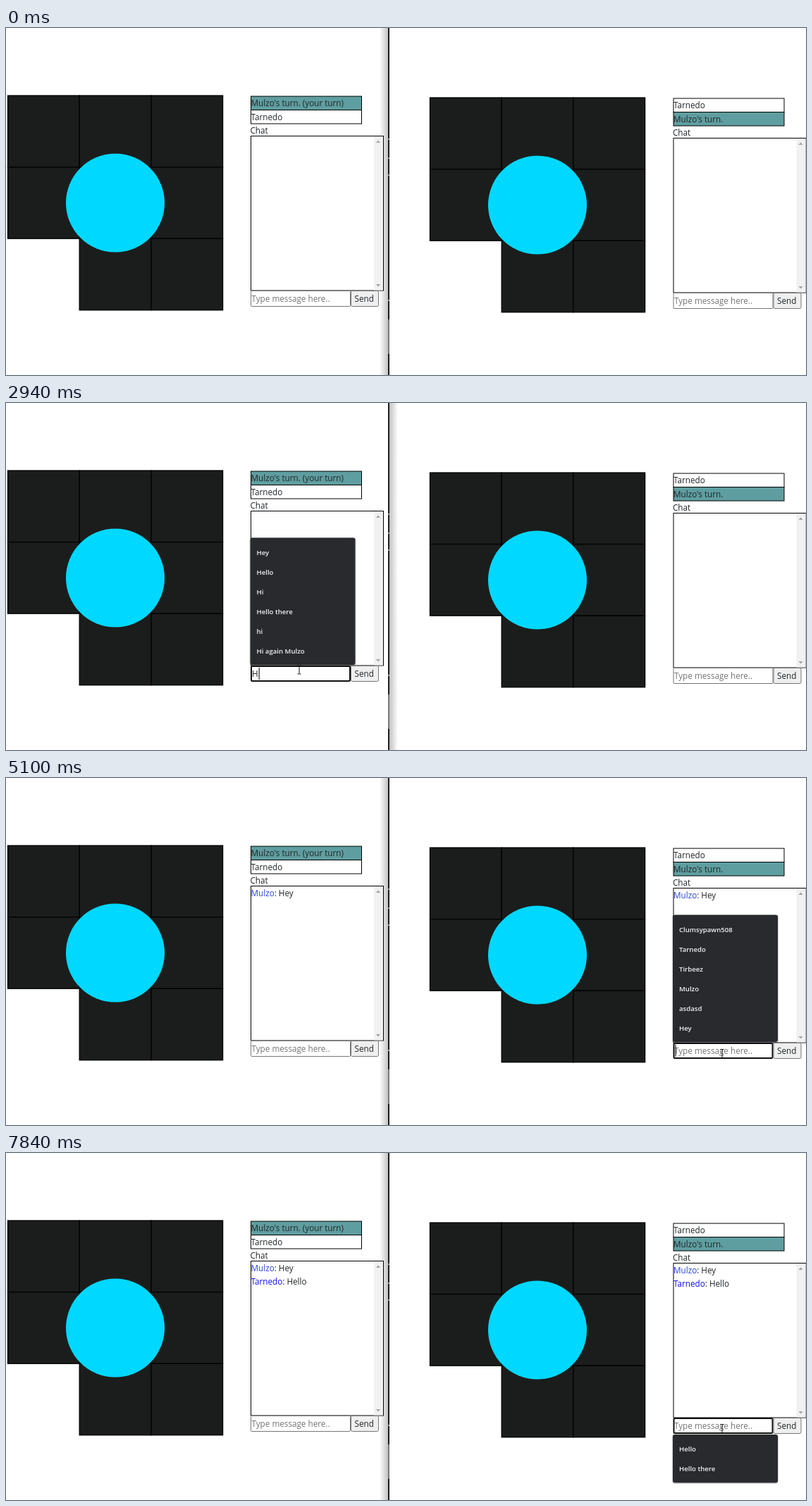
Recreate the animation shown at these times as an HTML page. Size 1135 by 493 pixels, loop 8 s.

```html
<!DOCTYPE html>
<html lang="en">
<head>
<meta charset="utf-8">
<title>Puzzle chat</title>
<style>
  html, body { margin: 0; width: 100%; height: 100%; overflow: hidden; background: #fff; }
  svg { display: block; font: 11.7px "Open Sans", "Noto Sans", sans-serif; fill: #212529; }
  .item { font-size: 9.6px; font-weight: 600; fill: #f1f2f4; }
  .hint { fill: #757575; }
</style>
</head>
<body>
<svg id="stage" width="1135" height="493" viewBox="0 0 1135 493"></svg>
<script>
const LOOP = 8000;
const ME = 'Mulzo', RIVAL = 'Tarnedo';
const stage = document.getElementById('stage');
const pen = document.createElement('canvas').getContext('2d');

const HISTORY = ['Clumsypawn508', RIVAL, 'Tirbeez', ME, 'asdasd', 'Hey'];
const H_WORDS = ['Hey', 'Hello', 'Hi', 'Hello there', 'hi', 'Hi again ' + ME];
const HE_WORDS = ['Hey', 'Hello', 'Hello there'];
const HEL_WORDS = ['Hello', 'Hello there'];

// Each step: start time, typed text, suggestions, caret visible
const LEFT = [
  [1940, '', [], 1], [2010, '', HISTORY, 1], [2470, '', HISTORY, 0],
  [2940, 'H', H_WORDS, 1], [3140, 'He', HE_WORDS, 1], [3270, 'Hey', ['Hey'], 1],
  [3420, '', ['Hey'], 1], [3490, '', [], 1], [3750, '', [], 0], [4270, '', [], 1], [4760, '', [], 0]
];
const RIGHT = [
  [4830, '', [], 1], [4960, '', HISTORY, 1], [5630, '', HISTORY, 0],
  [5890, 'H', H_WORDS, 1], [6020, 'He', HE_WORDS, 1], [6170, 'Hek', [], 1],
  [6310, 'Hekl', [], 1], [6580, 'Hek', [], 1], [6780, 'He', HE_WORDS, 1],
  [6910, 'Hel', HEL_WORDS, 1], [7040, 'Hell', HEL_WORDS, 1], [7240, 'Hello', HEL_WORDS, 1],
  [7510, '', HEL_WORDS, 1], [7840, '', HEL_WORDS, 0]
];
const SWITCH = 4830;

const TO_LEFT = [[503, 449], [470, 405], [410, 345], [358, 302], [332, 286], [352, 312],
  [379, 343], [398, 362], [409, 372], [414, 377], [416, 379]];
const TO_RIGHT = [[453, 384], [497, 387], [570, 391], [680, 396], [800, 398], [920, 397],
  [1030, 395], [1105, 394], [1123, 393], [1050, 392], [1016, 391.5]];

const rect = (x, y, w, h, fill, extra = '') =>
  `<rect x="${x}" y="${y}" width="${w}" height="${h}" fill="${fill}" ${extra}/>`;
const text = (x, y, s, cls = '') => `<text x="${x}" y="${y}" class="${cls}">${s}</text>`;
const group = (x, y, s) => `<g transform="translate(${x} ${y})">${s}</g>`;
const path = (d, extra) => `<path d="${d}" ${extra}/>`;
const latest = (steps, t) => steps.filter(s => s[0] <= t).pop();

function board() {
  let s = '';
  for (let row = 0; row < 3; row++)
    for (let col = row === 2 ? 1 : 0; col < 3; col++)
      s += rect(2.5 + col * 101.7, 96 + row * 101.6, 101.7, 101.6, '#1b1d1c', 'stroke="#000" stroke-width="1.3"');
  return s + '<circle cx="155" cy="248.5" r="70" fill="#00d8ff"/>';
}

function scrollbar() {
  return rect(522, 154, 13, 218.5, '#f1f1f1') +
    path('M525 163h6l-3-3.5zM525 364h6l-3 3.5z', 'fill="#a3a3a3"');
}

function suggestions(words) {
  const height = words.length * 28 + 12.5;
  const top = words.length > 3 ? 372 - height : 397;
  return rect(345.5, top - 0.5, 151, height + 2, '#000', 'rx="4" opacity=".18"') +
    rect(346.5, top, 149, height, '#292a2e', 'rx="3"') +
    words.map((w, i) => text(355.5, top + 24 + i * 28, w, 'item')).join('');
}

function input(state) {
  let s = state
    ? rect(348, 374, 140, 21, '#fff', 'rx="1.5" stroke="#101010" stroke-width="2"')
    : rect(347.5, 373.5, 141, 22, '#fff', 'rx="1" stroke="#767676"');
  const typed = state ? state[1] : '';
  s += typed ? text(349, 388.5, typed) : text(348.5, 388.5, 'Type message here..', 'hint');
  if (state && state[3]) {
    pen.font = getComputedStyle(stage).font;
    s += rect(350 + pen.measureText(typed).width, 376, 1, 17, '#000');
  }
  return s;
}

function panel(players, active, state, messages) {
  let s = '';
  players.forEach((name, i) => {
    s += rect(347.5, 97 + i * 19.5, 157, 19.5, i === active ? '#5f9ea0' : '#fff', 'stroke="#000"') +
      text(347.5, 111.3 + i * 19.5, name);
  });
  s += text(346.5, 149.7, 'Chat') +
    rect(347.5, 153.5, 188, 219.5, '#fff', 'stroke="#000"') + scrollbar();
  messages.forEach(([name, color, body], i) => {
    s += text(347.5, 168.3 + i * 18.8, `<tspan fill="${color}">${name}</tspan>: ${body}`);
  });
  s += input(state) +
    rect(489.5, 373.5, 39, 22, '#efefef', 'rx="2" stroke="#767676"') + text(494.5, 388.5, 'Send');
  return s + (state && state[2].length ? suggestions(state[2]) : '');
}

function divider(leftActive) {
  const shade = (x, from, to) => `<linearGradient id="shade"><stop stop-opacity="${from}"/>
    <stop offset="1" stop-opacity="${to}"/></linearGradient>` + rect(x, 0, 12, 493, 'url(#shade)');
  return (leftActive ? shade(544, 0.24, 0) : shade(530, 0, 0.24)) +
    rect(542, 0, 2, 493, '#1c1d20') + rect(542, 414, 2, 49, '#77797c') +
    [157, 184, 208, 386].map(y => rect(542, y, 2, 2, '#8d9195')).join('');
}

function cursor(t) {
  if (t < 1050) return '';
  const [route, start, step] = t < 4010 ? [TO_LEFT, 1050, 76] : [TO_RIGHT, 4010, 75];
  const [x, y] = route[Math.min(10, Math.floor((t - start) / step))];
  const overLeft = x > 347 && x < 489 && y > 373 && y < 396;
  const overRight = x > 947 && x < 1088 && y > 376 && y < 399;
  return group(x, y, overLeft || overRight
    ? path('M-2.5 -6h2l.5 .5 .5-.5h2M0-5.5v11M-2.5 6h2l.5-.5 .5.5h2', 'fill="none" stroke="#111"')
    : path('M0 0v12.5l2.9-2.7 2 4.6 2.1-.9-2-4.5h4z', 'fill="#fff" stroke="#111" stroke-width=".9"'));
}

function scene(t) {
  const left = t < SWITCH && latest(LEFT, t);
  const right = latest(RIGHT, t);
  const messages = [];
  if (t >= 3420) messages.push([ME, '#2a45d8', 'Hey']);
  if (t >= 7510) messages.push([RIVAL, '#1010f0', 'Hello']);
  return divider(Boolean(left)) + board() + group(599, 3, board()) +
    panel([ME + "'s turn. (your turn)", RIVAL], 0, left, messages) +
    group(599.5, 3, panel([RIVAL, ME + "'s turn."], 1, right, messages)) +
    cursor(t);
}

let shown = '';
function frame() {
  const next = scene(performance.now() % LOOP);
  if (next !== shown) stage.innerHTML = shown = next;
  requestAnimationFrame(frame);
}
frame();
</script>
</body>
</html>
```
